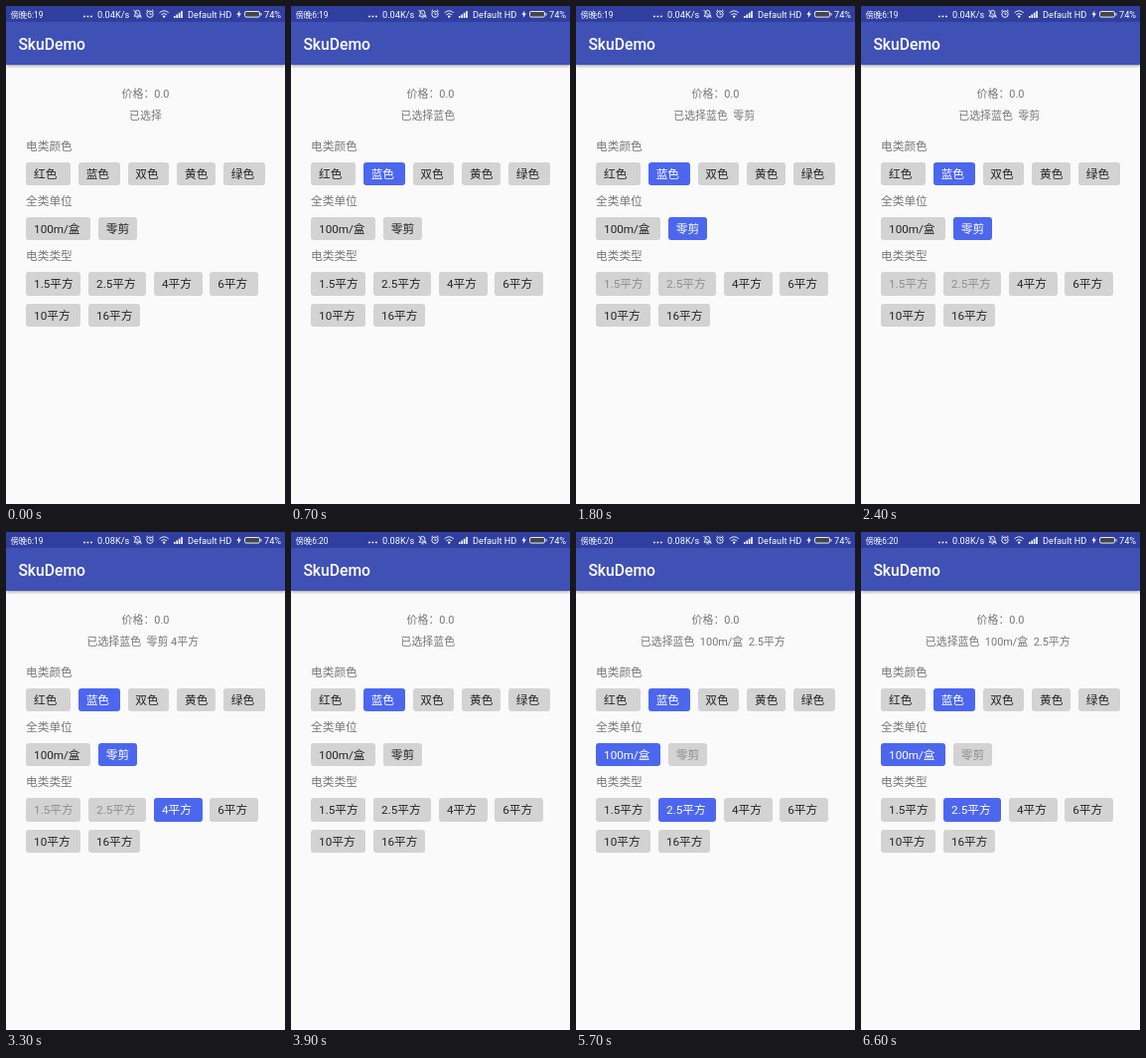
Animation, 281 px wide and 500 px high, one loop 6.7 s. Source, as an HTML page:

```html
<!DOCTYPE html>
<html lang="zh-CN">
<head>
<meta charset="utf-8">
<title>SkuDemo</title>
<style>
  html, body { margin: 0; width: 100%; height: 100%; overflow: hidden; background: #fafafa; }
  body { position: relative; font: 11.7px/24px Roboto, "Noto Sans CJK SC", sans-serif; color: #777; }
  body > * { position: absolute; white-space: pre; }
  #status { left: 0; top: 0; background: #303f9f; }
  #bar { left: 0; top: 16px; width: 100%; height: 43px; background: #3f51b5;
         box-shadow: 0 1px 3px rgba(0, 0, 0, .4); }
  #bar span { position: absolute; left: 12.4px; top: 11px; font-size: 15.7px; font-weight: 500; color: #fff; }
  .info { left: 0; width: 281px; text-align: center; font-size: 10.93px; }
  .label, .row { left: 20.3px; }
  .label { left: 20px; }
  .row { display: flex; gap: 7.8px; }
  .chip { height: 23.6px; padding: 0 7.8px; border-radius: 3px; background: #d3d3d3; color: #242424; }
  .chip.off { color: #8e8e8e; }
  .chip.on { background: #4c67ee; color: #fff; }
</style>
</head>
<body>
<div id="bar"><span>SkuDemo</span></div>
<svg id="status" width="281" height="16" fill="#fff" font-size="9.2">
  <text id="clock" x="4.5" y="11.5" font-size="8.4"></text>
  <path d="M78 10.5h1.8M81.5 10.5h1.8M85 10.5h1.8" stroke="#fff" stroke-width="1.6"/>
  <text id="speed" x="92" y="11.9"></text>
  <g fill="none" stroke="#fff" stroke-width=".9">
    <path d="M129 10.2h7l-1.2-1.8v-1.7a2.3 2.3 0 0 0-4.6 0v1.7zM131.5 11.8h2M128.5 4l8 8"/>
    <circle cx="145" cy="8.2" r="3.2"/>
    <path d="M145 6.4v2h1.6M141.4 5.3l1.6-1.5M148.6 5.3l-1.6-1.5"/>
    <path d="M154.6 6.8q4.6-4 9.2 0M156.3 8.8q2.9-2.6 5.8 0"/>
    <rect x="240.5" y="5.5" width="15" height="5.6" rx="1.6" fill="#44464c"/>
    <path d="M257 7v2.6"/>
  </g>
  <circle cx="159.2" cy="10.6" r="1.2"/>
  <path d="M169 12v-2h1.6v2zM171.4 12v-3.6h1.6v3.6zM173.8 12v-5.2h1.6v5.2zM176.2 12v-7h1.6v7z"/>
  <text x="183" y="11.9">Default HD</text>
  <path d="M235.4 4.5l-3 4.2h1.9l-.6 3.3 3.2-4.4h-2z"/>
  <text x="260" y="11.9">74%</text>
</svg>
<div class="info" style="top:76.5px">价格&#xff1a;0.0</div>
<div class="info" id="chosen" style="top:98.5px"></div>
<script>
const LOOP = 6700;
const labels = [[129, "电类颜色"], [184, "全类单位"], [239, "电类类型"]];
// Trailing blanks belong to the option names and widen their chips.
const rows = [
  [156.8, ["红色  ", "蓝色 ", "双色 ", "黄色", "绿色 "]],
  [211.8, ["100m/盒 ", "零剪"]],
  [267, ["1.5平方", "2.5平方 ", "4平方 ", "6平方 "]],
  [298.6, ["10平方 ", "16平方"]],
];
const taps = [
  [0, ""],
  [600, "蓝色"],
  [1600, "蓝色,零剪"],
  [3000, "蓝色,零剪,4平方"],
  [3500, "蓝色,4平方"],
  [3900, "蓝色"],
  [4200, "蓝色,2.5平方"],
  [5700, "蓝色,100m/盒,2.5平方"],
];
const conflicts = { "零剪": ["1.5平方", "2.5平方"], "1.5平方": ["零剪"], "2.5平方": ["零剪"] };

const byId = id => document.getElementById(id);
function add(parent, className, text = "", top) {
  const el = document.createElement("div");
  el.className = className;
  el.textContent = text;
  if (top) el.style.top = top + "px";
  return parent.appendChild(el);
}

for (const [top, text] of labels) add(document.body, "label", text, top);
const chips = rows.flatMap(([top, names]) => {
  const row = add(document.body, "row", "", top);
  return names.map(name => ({ name, key: name.trim(), el: add(row, "chip", name) }));
});

function draw(t) {
  const picked = taps.findLast(([start]) => t >= start)[1].split(",");
  let summary = "已选择";
  for (const { name, key, el } of chips) {
    const on = picked.includes(key);
    const off = conflicts[key]?.some(other => picked.includes(other));
    el.className = "chip" + (on ? " on" : off ? " off" : "");
    if (on) summary += name + " ";
  }
  byId("chosen").textContent = summary;
  byId("clock").textContent = t < 3900 ? "傍晚6:19" : "傍晚6:20";
  byId("speed").textContent = t < 3000 ? "0.04K/s" : "0.08K/s";
}

const began = performance.now();
function tick() {
  draw((performance.now() - began) % LOOP);
  requestAnimationFrame(tick);
}
tick();
</script>
</body>
</html>
```
